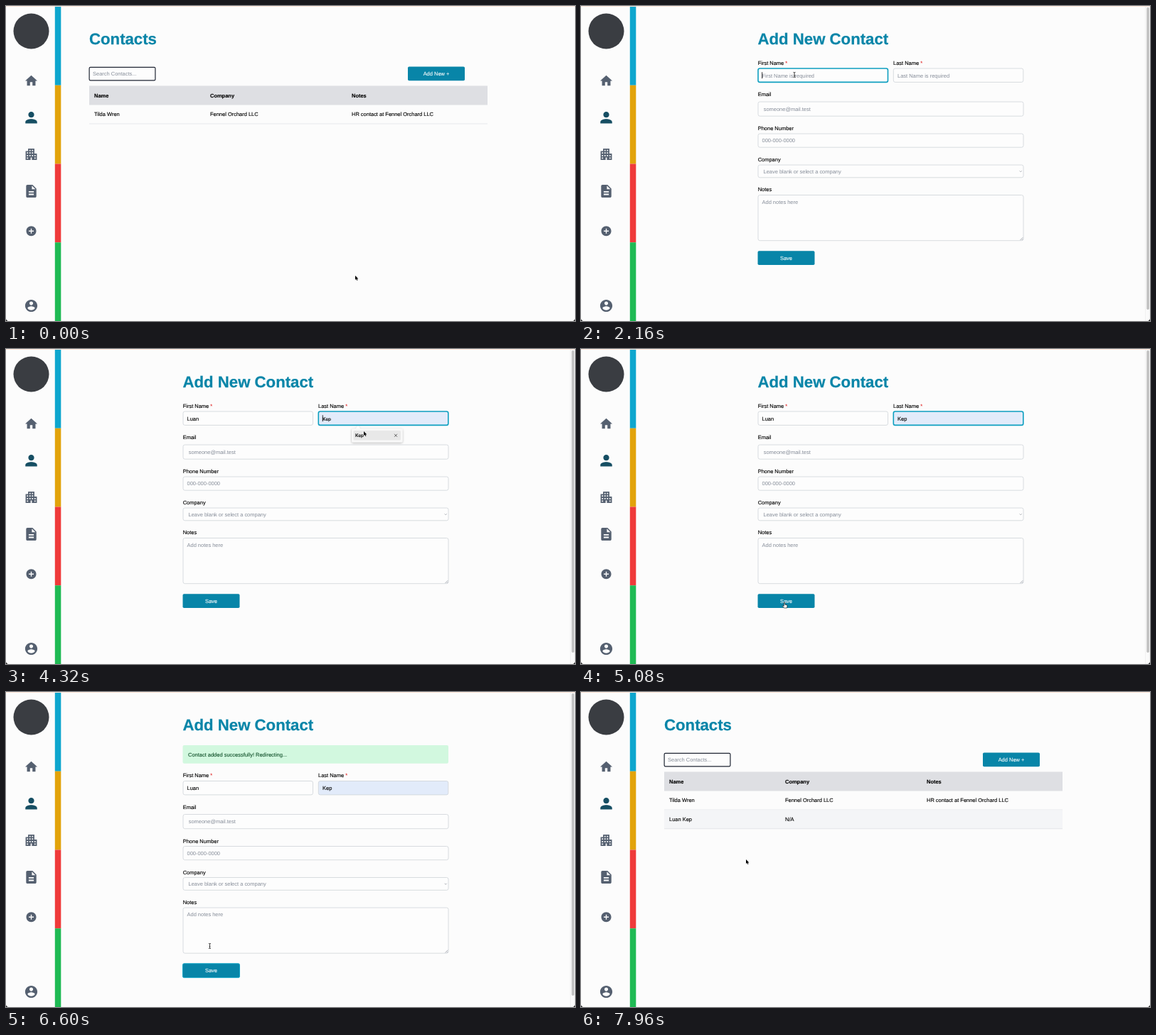
An HTML page that plays this animation: 800x444 px, repeating every 8000 ms.

```html
<!DOCTYPE html>
<html lang="en">
<head>
<meta charset="utf-8">
<title>Contacts</title>
<style>
  html, body { margin: 0; width: 100%; height: 100%; overflow: hidden; background: #fcfcfc; }
  svg { display: block; width: 100%; height: 100%; }
  text {
    font: 7.48px "Liberation Sans", Arial, sans-serif; text-rendering: geometricPrecision;
    fill: #000; stroke: #000; stroke-width: .12; white-space: pre;
  }
  .title { font-size: 22.2px; font-weight: bold; fill: #0885a8; stroke: #0885a8; stroke-width: .25; }
  .bold { font-weight: bold; }
  .hint { fill: #858c98; stroke: none; }
  .success { fill: #14532d; stroke: #14532d; }
  .button { fill: #fff; stroke: #fff; text-anchor: middle; }
  .popup { font: 500 6.4px Inter, sans-serif; }
  .field { fill: #fdfdfd; stroke: #cfd3d9; stroke-width: .8; }
  .filled { fill: #e2ebfa; }
  .focus { stroke: #0e9fc0; stroke-width: 1.6; }
</style>
</head>
<body>
<svg id="stage" viewBox="0 0 800 444" preserveAspectRatio="none">
  <defs>
    <filter id="shadow" x="-20%" y="-40%" width="140%" height="200%">
      <feDropShadow dx="0" dy="1" stdDeviation="1.5" flood-opacity=".3"/>
    </filter>
  </defs>
  <rect width="800" height="444" fill="#fcfcfc"/>
  <g id="sidebar"></g>
  <g id="list"></g>
  <g id="form"></g>
  <rect width="800" height="1" fill="#fde5d8"/>
  <path d="M0 444v-3.5q.3 3.2 3.5 3.5zM800 444v-3.5q-.3 3.2-3.5 3.5z" fill="#111"/>
  <g id="cursor">
    <path id="arrow" d="M0 0v5.9l1.4-1.2 1 2.2 1-.4-.9-2.1h1.9z" fill="#000" stroke="#fff" stroke-width=".5" paint-order="stroke"/>
    <path id="beam" d="M-1.5-3.6q1.5 0 1.5 1v5.2q0 1-1.5 1M1.5-3.6q-1.5 0-1.5 1M1.5 3.6q-1.5 0-1.5-1M-.8.9h1.6" fill="none" stroke="#111" stroke-width=".8"/>
    <path id="hand" d="M-.7.5a.7.7 0 0 1 1.4 0v2.7l2.4.5q1 .3.9 1.3l-.5 3h-4l-2.2-2.6q.2-1 1.2-.5l.8.7z" fill="#fff" stroke="#000" stroke-width=".6"/>
  </g>
</svg>
<script>
const LOOP = 8000;
const FIRST = "Luan", LAST = "Kep", COMPANY = "Fennel Orchard LLC";
const SHIFT = 37.5;
const at = { form: 1080, focusFirst: 1960, typing: 2320, key: 190, focusLast: 3300, popup: 3440,
             preview: 4000, pick: 4480, save: 5120, message: 5240, list: 7200 };
// time, x, y
const path = [
  [120, 491, 380], [880, 621, 97], [1280, 621, 97], [1720, 300, 97], [3130, 300, 97],
  [3300, 488, 98], [3700, 492, 100], [4000, 503, 116], [4520, 503, 116],
  [5040, 286, 357], [5600, 286, 357], [6000, 286.5, 358], [7700, 286.5, 358], [7920, 232, 236]
];

const $ = id => document.getElementById(id);
const show = (el, on) => el.style.display = on ? "" : "none";
const text = (x, y, s, cls = "", id = "") => `<text x="${x}" y="${y}" class="${cls}" id="${id}">${s}</text>`;
const rect = (x, y, w, h, fill, r = 0, extra = "") =>
  `<rect x="${x}" y="${y}" width="${w}" height="${h}" rx="${r}" fill="${fill}" ${extra}/>`;
const field = (id, [x, y, w, h]) => rect(x, y, w, h, "", 2.5, `class="field" id="${id}"`);
const label = (x, y, s, required) =>
  text(x, y, s + (required ? ' <tspan fill="#e02424" stroke="#e02424">*</tspan>' : ""));
const icon = (y, scale, d, fill = "#556070") =>
  `<path transform="translate(35.5 ${y}) scale(${scale}) translate(-12 -12)" fill="${fill}" fill-rule="evenodd" d="${d}"/>`;

const disc = "M12 2C6.48 2 2 6.48 2 12s4.48 10 10 10 10-4.48 10-10S17.52 2 12 2z";
const windows = [[5, 9], [5, 13], [5, 17], [9, 5], [9, 9], [9, 13], [13, 5], [13, 9], [13, 13], [17, 13], [17, 17]]
  .map(([x, y]) => `M${x} ${y}v2h2v-2z`).join("");

$("sidebar").innerHTML =
  '<circle cx="35.5" cy="35.5" r="25" fill="#3a3d42"/>' +
  ["#0ea6ce", "#e2a30b", "#ef3a3a", "#1fba54"].map((c, i) => rect(68.8, 1 + i * 110.75, 8.5, 110.75, c)).join("") +
  icon(105.5, .85, "M10 20v-6h4v6h5v-8h3L12 3 2 12h3v8z") +
  icon(157.3, 1.03, "M12 12c2.21 0 4-1.79 4-4s-1.79-4-4-4-4 1.79-4 4 1.79 4 4 4zm0 2c-2.67 0-8 1.34-8 4v2h16v-2c0-2.66-5.33-4-8-4z", "#164e63") +
  icon(209, .88, "M17 11V3H7v4H3v14h8v-4h2v4h8V11z" + windows) +
  icon(261, .9, "M14 2H6c-1.1 0-2 .9-2 2v16c0 1.1.9 2 2 2h12c1.1 0 2-.9 2-2V8zm2 16H8v-2h8zm0-4H8v-2h8zm-3-5V3.5L18.5 9z") +
  icon(317.3, .7, disc + "m5 11h-4v4h-2v-4H7v-2h4V7h2v4h4z") +
  icon(422.5, .86, disc + "m0 3c1.66 0 3 1.34 3 3s-1.34 3-3 3-3-1.34-3-3 1.34-3 3-3zm0 14.2c-2.5 0-4.71-1.28-6-3.22.03-1.99 4-3.08 6-3.08s5.97 1.09 6 3.08c-1.29 1.94-3.5 3.22-6 3.22z");

const row = (y, cells, cls) => [124, 287, 486].map((x, i) => text(x, y, cells[i], cls)).join("");
$("list").innerHTML =
  text(117, 54.3, "Contacts", "title") +
  rect(117.1, 86.4, 92.8, 18.4, "#fdfdfd", 1.6, 'stroke="#1f2533" stroke-width="1.2"') +
  text(122, 98.4, "Search Contacts...", "hint") +
  rect(565, 85.5, 80, 19.8, "#0885a8", 1.8) + text(605, 98.3, "Add New +", "button") +
  rect(117, 112.5, 560, 27, "#dedfe3") + row(128.8, ["Name", "Company", "Notes"], "bold") +
  row(155.4, ["Tilda Wren", COMPANY, "HR contact at " + COMPANY]) +
  rect(117, 165.6, 560, .8, "#dfe1e5") +
  `<g id="newRow">${rect(117, 166.4, 560, 26.2, "#f4f5f7")}${row(182, [FIRST + " " + LAST, "N/A", ""])}${rect(117, 192.4, 560, .8, "#dfe1e5")}</g>`;

const boxes = {
  first: [249, 88, 182.5, 19.4], last: [439.3, 88, 182.5, 19.4], email: [249, 135, 373, 20.2],
  phone: [249, 180, 373, 19.2], company: [249, 224, 373, 17.8], notes: [249, 266.5, 373, 64.2]
};
$("form").innerHTML =
  text(248.5, 54.3, "Add New Contact", "title") +
  rect(793.5, 1, 6.5, 443, "#fafafa", 0, 'stroke="#ececec" stroke-width=".6"') +
  rect(795.3, 2, 3.6, 426, "#c1c1c1", 1.8) +
  `<g id="message">${rect(248.5, 75, 373.5, 25.8, "#d2f8df", 2)}${text(256, 90.6, "Contact added successfully! Redirecting...", "success")}</g>` +
  '<g id="fields">' +
  label(248.7, 82.8, "First Name", true) + label(439, 82.8, "Last Name", true) +
  label(248.7, 127.2, "Email") + label(248.7, 175, "Phone Number") +
  label(248.7, 219, "Company") + label(248.7, 261.4, "Notes") +
  Object.keys(boxes).map(k => field(k, boxes[k])).join("") +
  text(254.5, 100.5, "", "", "firstText") + text(445, 100.5, "", "", "lastText") +
  text(256.7, 147.7, "someone@mail.test", "hint") + text(254.5, 192.3, "000-000-0000", "hint") +
  text(256.5, 235.5, "Leave blank or select a company", "hint") + text(254.5, 278.8, "Add notes here", "hint") +
  '<path d="M616.7 232.3l1.5 1.5 1.5-1.5M617.5 330l3.8-3.8M619.7 330l1.6-1.6" fill="none" stroke="#8a8f98" stroke-width=".7"/>' +
  rect(248.5, 345.3, 80, 19.8, "#0885a8", 1.8, 'id="save"') + text(288.5, 357.8, "Save", "button") +
  rect(0, 93.2, .8, 9, "#000", 0, 'id="caret"') + "</g>" +
  `<g id="popup"><g filter="url(#shadow)"><path d="M492 112l3-3.5 3 3.5z" fill="#fff"/>${rect(486, 112, 71.5, 19.5, "#f8f8f8", 2)}</g>` +
  rect(488.5, 115, 66.5, 13.6, "#e8e8e8", 1.5, 'id="option"') + text(491, 124.2, LAST, "popup") +
  '<path d="M546 119.8l4 4m0-4l-4 4" stroke="#444" stroke-width=".8"/></g>';

function setText(id, value, hint, preview = false) {
  const el = $(id);
  el.textContent = value || hint;
  el.setAttribute("class", value ? (preview ? "popup" : "") : "hint");
}

function pointer(t) {
  const i = path.findIndex(p => p[0] > t);
  if (i === 0) return path[0].slice(1);
  if (i < 0) return path.at(-1).slice(1);
  const [t0, x0, y0] = path[i - 1], [t1, x1, y1] = path[i];
  const u = (t - t0) / (t1 - t0), e = u * u * (3 - 2 * u);
  return [x0 + (x1 - x0) * e, y0 + (y1 - y0) * e];
}

const inside = (x, y, [bx, by, w, h]) => x >= bx && x <= bx + w && y >= by && y <= by + h;

function pointerKind(x, y, onForm, shift) {
  if (!onForm) return inside(x, y, [565, 85, 80, 20]) ? "hand" : "arrow";
  if (inside(x, y - shift, [248.5, 345, 80, 20])) return "hand";
  return Object.keys(boxes).some(k => k !== "company" && inside(x, y - shift, boxes[k])) ? "beam" : "arrow";
}

function render(t) {
  const onForm = t >= at.form && t < at.list;
  const sent = t >= at.message, shift = sent ? SHIFT : 0;
  const focus = t < at.focusFirst ? "" : t < at.focusLast ? "first" : t < at.save ? "last" : "save";
  show($("list"), !onForm);
  show($("form"), onForm);
  show($("newRow"), t >= at.list);
  show($("message"), sent);
  $("fields").setAttribute("transform", `translate(0 ${shift})`);

  const typed = FIRST.slice(0, Math.max(0, Math.ceil((t - at.typing) / at.key)));
  const preview = t >= at.preview && t < at.pick, picked = t >= at.pick;
  setText("firstText", typed, "First Name is required");
  setText("lastText", preview || picked ? LAST : "", "Last Name is required", preview);
  $("first").classList.toggle("focus", focus === "first");
  $("last").classList.toggle("focus", focus === "last");
  $("last").classList.toggle("filled", preview || picked);
  $("save").setAttribute("stroke", focus === "save" ? "#12a5c6" : "none");
  show($("popup"), t >= at.popup && t < at.pick);
  show($("option"), preview);

  const inFirst = focus === "first";
  const typing = inFirst && t >= at.typing && t < 3130;
  const since = t - (inFirst ? at.focusFirst : picked ? at.pick : at.focusLast);
  show($("caret"), (inFirst || focus === "last") && (typing || since % 1000 < 500));
  if (onForm) {
    const hasValue = inFirst ? typed : picked;
    const width = hasValue ? $(inFirst ? "firstText" : "lastText").getComputedTextLength() : 0;
    $("caret").setAttribute("x", (inFirst ? 254.3 : 444.8) + width);
  }

  const [x, y] = pointer(t);
  const overPopup = t >= at.popup && t < at.pick && y > 107;
  const kind = overPopup ? "arrow" : pointerKind(x, y, onForm, shift);
  for (const k of ["arrow", "beam", "hand"]) show($(k), k === kind);
  show($("cursor"), !typing);
  $("cursor").setAttribute("transform", `translate(${x} ${y})`);
}

const start = performance.now();
function tick() {
  render((performance.now() - start) % LOOP);
  requestAnimationFrame(tick);
}
tick();
</script>
</body>
</html>
```
